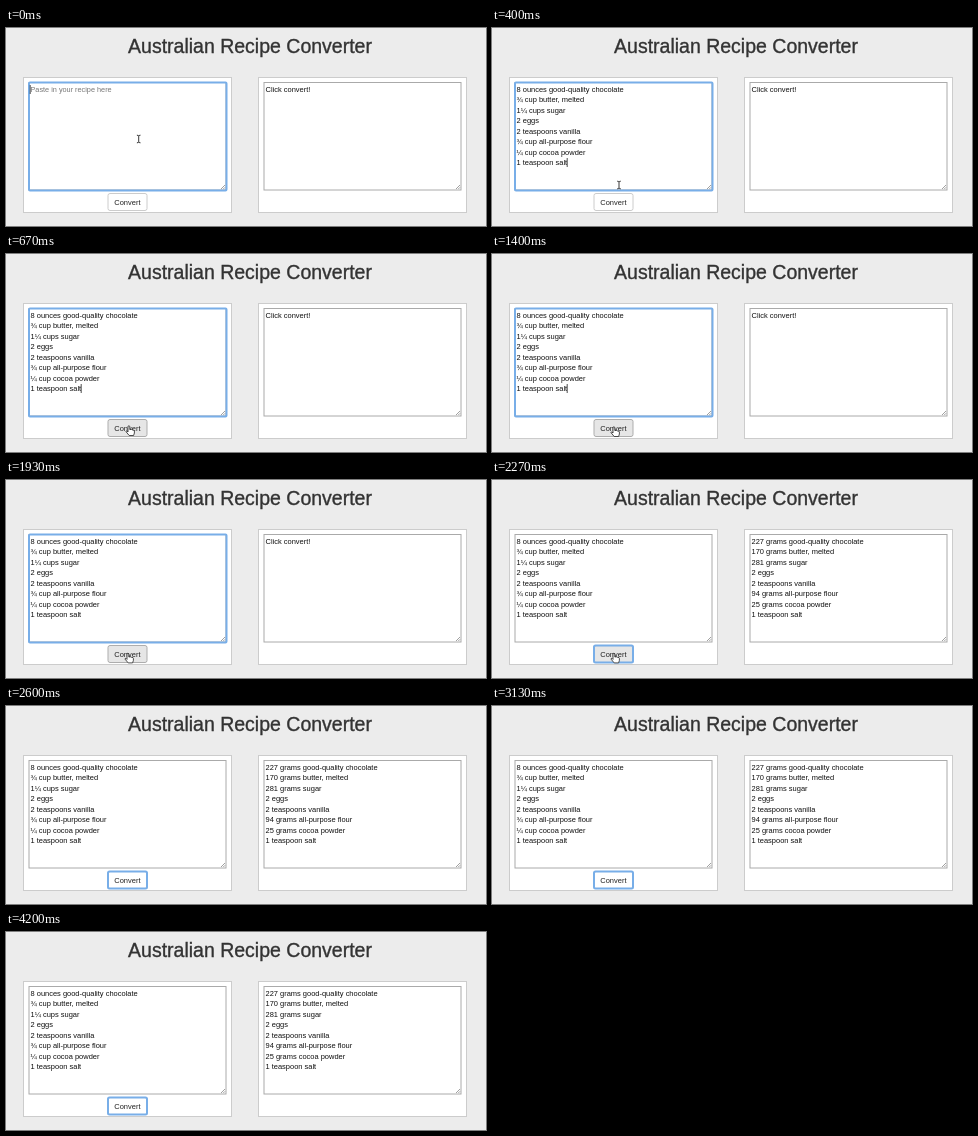
An HTML page that plays this animation: 480 px wide and 198 px high, repeating every 5.07 s.

```html
<!DOCTYPE html>
<html lang="en">
<head>
<meta charset="utf-8">
<title>Recipe converter</title>
<style>
  html, body { margin: 0; width: 100%; height: 100%; overflow: hidden; background: #ececec; }
  svg { display: block; width: 100vw; height: 100vh; }
  text { font-family: "Liberation Sans", Arial, sans-serif; font-size: 7.47px; fill: #111; }
  .title { font-size: 19.5px; fill: #333; stroke: #333; stroke-width: .35px; text-anchor: middle; }
  .hint { font-size: 7.3px; fill: #777; }
  .label { text-anchor: middle; fill: #222; }
  .panel { fill: #fff; stroke: #ccc; }
  .area { fill: #fff; stroke: #aaa; }
  .ring { fill: none; stroke: #78aee8; stroke-width: 2; }
</style>
</head>
<body>
<svg id="stage" viewBox="0 0 480 198">
  <rect width="480" height="198" fill="#ececec"/>
  <text class="title" x="244" y="24.5">Australian Recipe Converter</text>
  <g id="panels"></g>
  <rect id="areaRing" class="ring" x="23" y="54.5" width="197.5" height="108" rx="1"/>
  <text id="hint" class="hint" x="24.5" y="64">Paste in your recipe here</text>
  <g id="recipe"></g>
  <text id="prompt" x="259.5" y="64">Click convert!</text>
  <g id="result"></g>
  <path id="caret" d="M0 0v9" stroke="#222" stroke-width=".8"/>
  <rect id="button" x="102" y="165.5" width="39" height="17" rx="2"/>
  <rect id="buttonRing" class="ring" x="102" y="165.5" width="39" height="17" rx="1.5"/>
  <text class="label" x="121.4" y="176.7">Convert</text>
  <g id="beam" fill="none" stroke="#222" stroke-width=".9">
    <path d="M-1.8-3.8Q0-3.8 0-2.8V2.8Q0 3.8-1.8 3.8M1.8-3.8Q0-3.8 0-2.8M0 2.8Q0 3.8 1.8 3.8"/>
  </g>
  <path id="hand" fill="#fff" stroke="#222" stroke-width=".8" stroke-linejoin="round"
    d="M-1 .2Q0-.6.8.3V3.6L2.4 3.4 3.7 4 5 4.2 5.4 5V7L4.6 9.5H.2L-3 5.7Q-2.9 4.6-1.9 5L-1 6Z"/>
  <path id="arrow" fill="#222" stroke="#fff" stroke-width=".6" d="M0 0V8.5L2 6.7 3.4 9.7 4.8 9.1 3.5 6.2H6.2Z"/>
</svg>
<script>
const LOOP = 5070;
const $ = id => document.getElementById(id);
const show = (id, on) => $(id).setAttribute("visibility", on ? "visible" : "hidden");
const place = (id, x, y) => $(id).setAttribute("transform", `translate(${x} ${y})`);
const within = (t, from, to) => t >= from && t < to;

const panel = x => `
  <rect class="panel" x="${x + .5}" y="49.5" width="208" height="135"/>
  <rect class="area" x="${x + 6}" y="54.5" width="197" height="107.5"/>
  <path d="M${x + 198} 161l4-4M${x + 200.3} 161l1.7-1.7" stroke="#777" stroke-width=".7"/>`;
$("panels").innerHTML = panel(17) + panel(252);

const lines = (x, list) => list.map((line, i) =>
  `<text x="${x}" y="${64 + i * 10.47}">${line}</text>`).join("");
const rest = ["2 eggs", "2 teaspoons vanilla"];
$("recipe").innerHTML = lines(24.5, [
  "8 ounces good-quality chocolate", "¾ cup butter, melted", "1¼ cups sugar", ...rest,
  "¾ cup all-purpose flour", "¼ cup cocoa powder", "1 teaspoon salt"]);
$("result").innerHTML = lines(259.5, [
  "227 grams good-quality chocolate", "170 grams butter, melted", "281 grams sugar", ...rest,
  "94 grams all-purpose flour", "25 grams cocoa powder", "1 teaspoon salt"]);

// Pointer steps: time, shape, x, y
const pointer = [
  [0, "beam", 132.7, 111], [70, "beam", 132, 120], [130, "beam", 129, 144],
  [200, "beam", 127, 157], [470, "arrow", 126, 162], [530, "hand", 125, 167],
  [600, "hand", 124, 170], [670, "hand", 123, 172], [730, "hand", 122, 173],
  [1600, "hand", 122, 173.4], [2470, "arrow", 130, 177], [2530, "arrow", 138, 181],
  [2600, "none"], [2800, "arrow", 146, 185], [2870, "arrow", 215, 183],
  [2930, "arrow", 300, 175], [3000, "arrow", 380, 165], [3070, "arrow", 448, 153],
  [3130, "none"]
];

function draw(t) {
  const pasted = t >= 400, clicked = t >= 2130, converted = t >= 2200;
  show("hint", !pasted);
  show("recipe", pasted);
  show("prompt", !converted);
  show("result", converted);
  show("areaRing", !clicked);
  show("buttonRing", clicked);

  show("caret", t < 930 || within(t, 1400, 1930));
  place("caret", pasted ? 75.2 : 24.2, pasted ? 130 : 57);

  const hover = within(t, 530, 2330);
  const pressed = within(t, 2130, 2270);
  $("button").setAttribute("fill", pressed ? "#d8d8d8" : hover ? "#e6e6e6" : "#fff");
  $("button").setAttribute("stroke", hover ? "#adadad" : "#ccc");

  const [, shape, x, y] = pointer.findLast(step => step[0] <= t);
  for (const id of ["beam", "hand", "arrow"]) show(id, id === shape);
  if (shape !== "none") place(shape, x, y);
}

const start = performance.now();
function tick(now) {
  draw(Math.max(0, now - start) % LOOP);
  requestAnimationFrame(tick);
}
draw(0);
requestAnimationFrame(tick);
</script>
</body>
</html>
```
